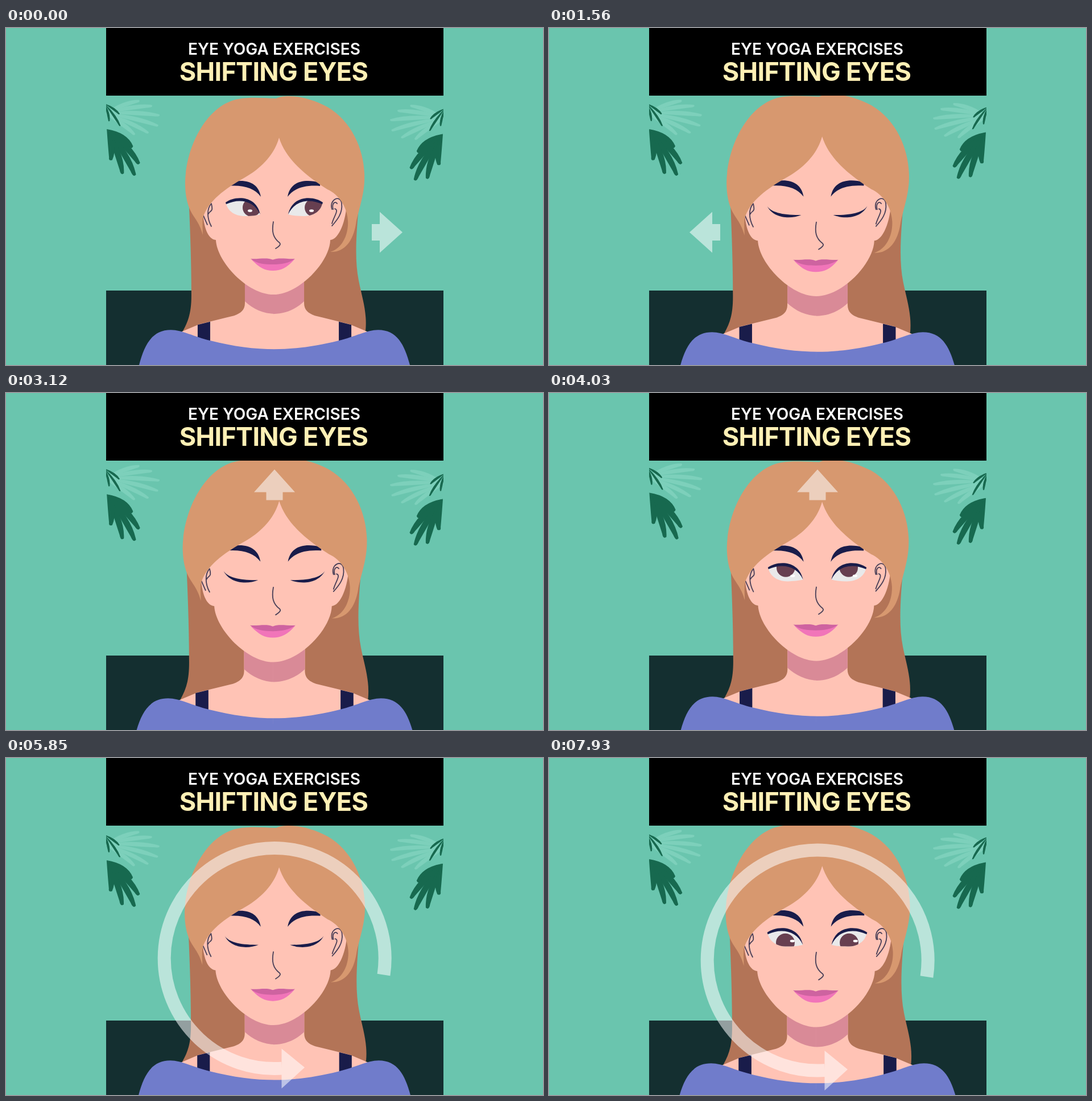
An HTML page for the animation above (8000 ms loop, 944x593 px).

```html
<!DOCTYPE html>
<html lang="en">
<head>
<meta charset="utf-8">
<title>Shifting eyes</title>
<style>
  html, body { margin: 0; width: 100%; height: 100%; overflow: hidden; background: #6ac5ae; }
  svg { display: block; width: 100%; height: 100%; }
  text { font-family: Inter, Lato, sans-serif; text-anchor: middle; }
  .navy { fill: #191c4a; }
  .line { fill: none; stroke: #4a4058; stroke-width: 1.8; stroke-linecap: round; }
</style>
</head>
<body>
<svg viewBox="0 0 944 593">
  <defs>
    <clipPath id="panel"><rect x="176" width="593" height="593"/></clipPath>
    <path id="lid" d="M387 309C390 322 402 331 420 331C430 331 440 330 447 328C438 302 410 299 387 309Z"/>
    <clipPath id="lidClip"><use href="#lid"/></clipPath>
  </defs>

  <g clip-path="url(#panel)">
    <rect x="176" y="462" width="593" height="131" fill="#142f30"/>
    <g id="leafL"></g>
    <g id="leafR"></g>

    <g id="body">
      <path fill="#b37457" d="M321 290C323 340 326 400 326 470C326 500 321 515 311 533L350 545H600L632 532C635 500 626 475 620 445C612 405 616 360 621 300Z"/>
      <g id="torso">
        <path fill="#ffc3b5" d="M420 430V484C420 496 413 502 401 506L340 521L309 534L340 575H474V430Z"/>
        <path fill="#d98a97" d="M420 430H474V503C452 503 434 494 420 481Z"/>
        <path class="navy" d="M337 522L359 516.5V560H337Z"/>
        <path fill="#707ccb" d="M230 610C240 565 252 531 290 531C310 531 330 543 360 550C400 560 436 565 474 565V610Z"/>
      </g>
      <use href="#torso" transform="matrix(-1 0 0 1 944 0)"/>
      <path fill="#ffc3b5" d="M346 320C347 350 355 372 369 373C371 412 425 469 470 469C515 469 569 412 570 373C585 372 598 340 599 305L590 280L480 180L380 270Z"/>

      <path class="line" d="M361 309C353 318 353 334 361 349M361 309C365 325 359 320 356 327M347 330L354 346"/>
      <path class="line" d="M573 319C567 302 588 292 590 309C592 326 582 338 573 348M575 319C572 308 579 304 582 309M578 318C586 320 576 332 573 344"/>
      <path class="line" d="M470 341C467 358 469 369 481 378C484 381 479 385 474 388"/>
      <path fill="#f175b9" d="M432 408C446 422 455 427 469 427C483 427 494 422 507 407Z"/>
      <path fill="#ce63a0" d="M430 406C445 407 459 403 469 408C479 403 494 407 508 406C497 414 484 416 469 416C455 416 441 415 430 406Z"/>
      <g id="eyeL"></g>
      <g id="eyeR" transform="matrix(-1 0 0 1 943 0)"></g>

      <path fill="#d7986f" d="M480 193C472 222 450 246 420 263C385 283 355 304 346 335C345 345 346 355 346 364C340 340 328 332 322 316C317 303 315 288 315 272C316 210 352 136 408 125C435 121 455 124 475 124C490 117 525 118 565 139C611 166 631 220 630 265C630 295 618 325 615 345C610 375 595 395 570 394C590 388 602 365 601 340C600 315 585 293 565 284C530 262 492 232 480 193Z"/>
    </g>

    <path id="arrow" fill="#fff" opacity=".54" d="M-54 -14.5H-40V-36L0 0L-40 36V14.5H-54Z"/>
    <g id="ring" opacity=".54">
      <path fill="none" stroke="#fff" stroke-width="23" d="M664 385A194 194 0 1 0 485 549.6"/>
      <path fill="#fff" d="M484.5 515L525 548L484.5 585Z"/>
    </g>

    <rect x="176" width="593" height="119"/>
    <text x="471.5" y="47" font-size="28" font-weight="600" fill="#fff">EYE YOGA EXERCISES</text>
    <text x="470.5" y="93" font-size="45" font-weight="700" letter-spacing="-.7" fill="#fff0b5">SHIFTING EYES</text>
  </g>
</svg>

<script>
const LOOP = 8000, STEP = 130;
const { PI, sin, cos, floor, min } = Math;
const $ = id => document.getElementById(id);
const show = (el, on) => el.setAttribute("display", on ? "inline" : "none");
const move = (el, value) => el.setAttribute("transform", value);

// Blades spread from one base point; the middle ones are longest.
function fan({ x, y, from, to, count, length, extra, width, color }) {
  let out = "";
  for (let i = 0; i < count; i++) {
    const k = i / (count - 1);
    const len = length + extra * sin(PI * k);
    out += `<path fill="${color}" transform="translate(${x} ${y}) rotate(${from + (to - from) * k})"
      d="M0 0Q${len * .6} ${-width * 1.6} ${len} ${-width * .2}Q${len * 1.03} ${width * .5} ${len * .9} ${width * .3}Q${len * .5} ${width * .2} 0 0Z"/>`;
  }
  return out;
}

$("leafL").innerHTML = $("leafR").innerHTML =
  fan({ x: 173, y: 150, from: -20, to: 35, count: 6, length: 65, extra: 33, width: 7, color: "#7dd0bb" }) +
  fan({ x: 177, y: 178, from: 35, to: 82, count: 5, length: 55, extra: 40, width: 10, color: "#17694f" }) +
  fan({ x: 173, y: 133, from: 35, to: 75, count: 3, length: 32, extra: 16, width: 4, color: "#17694f" });

function makeEye(id, glintX, side) {
  const el = $(id);
  el.innerHTML = `
    <path class="navy" d="M391 272C422 264 444 272 448 297C437 282 418 276 391 278Z"/>
    <g class="open">
      <use href="#lid" fill="#e9e9ea"/>
      <g clip-path="url(#lidClip)">
        <circle class="iris" r="16" fill="#673f50"/>
        <ellipse cx="${glintX}" cy="321.5" rx="4" ry="2.3" fill="#fff"/>
      </g>
      <path class="navy" d="M386 307C400 296 439 292 447 328C436 304 411 299 387 310Z"/>
    </g>
    <path class="shut navy" d="M385 313C392 324 412 329 444 328.5C426 336 396 335 385 313Z"/>`;
  const find = name => el.querySelector("." + name);
  return { open: find("open"), shut: find("shut"), iris: find("iris"), side };
}
const eyes = [makeEye("eyeL", 429, 1), makeEye("eyeR", 406, -1)];

// Each direction lasts one phase and opens with closed eyes; the last phase rolls.
const PHASE = 1430, FIRST = -130, SHUT = 520;
const directions = [0, 180, -90, 90];
const ROLL_DELAY = 780, QUARTER = 520;

// Inhale, short hold, quicker exhale
function breathAt(t) {
  const inhale = 3100, exhale = 1700, cycle = 5200;
  const p = (t + 300) % cycle;
  const k = min(p / inhale, 1, (cycle - p) / exhale);
  return (1 - cos(PI * k)) / 2;
}

function draw(t) {
  const size = 1 + .028 * breathAt(t);
  move($("body"), `translate(472 304) scale(${size}) translate(-472 -304)`);

  const sway = t / 3170 * 2 * PI;
  move($("leafL"), `translate(${.7 * cos(sway) - .5} ${-2.4 * sin(sway)})`);
  move($("leafR"), `translate(945 ${7 + 1.5 * cos(sway)}) scale(-1 1)`);

  const index = floor((t - FIRST) / PHASE);
  const since = t - FIRST - index * PHASE;
  const rolling = index >= directions.length;
  const rollTime = t - FIRST - directions.length * PHASE;
  const shut = rolling ? rollTime < SHUT : index > 0 && since < SHUT;
  const angle = rolling
    ? -90 * Math.max(0, rollTime - ROLL_DELAY) / QUARTER
    : directions[index];

  const look = angle * PI / 180;
  for (const eye of eyes) {
    show(eye.open, !shut);
    show(eye.shut, shut);
    eye.iris.setAttribute("cx", 417 + 15 * cos(look) * eye.side);
    eye.iris.setAttribute("cy", 316 + 8.5 * sin(look));
  }

  show($("arrow"), !rolling);
  show($("ring"), rolling);
  move($("arrow"), `translate(472 359.5) rotate(${angle}) translate(225 0)`);
  move($("ring"), `translate(0 ${shut ? -3.5 : 0})`);
}

const begin = performance.now();
function tick() {
  const t = (performance.now() - begin) % LOOP;
  draw(floor(t / STEP) * STEP);
  requestAnimationFrame(tick);
}
tick();
</script>
</body>
</html>
```
